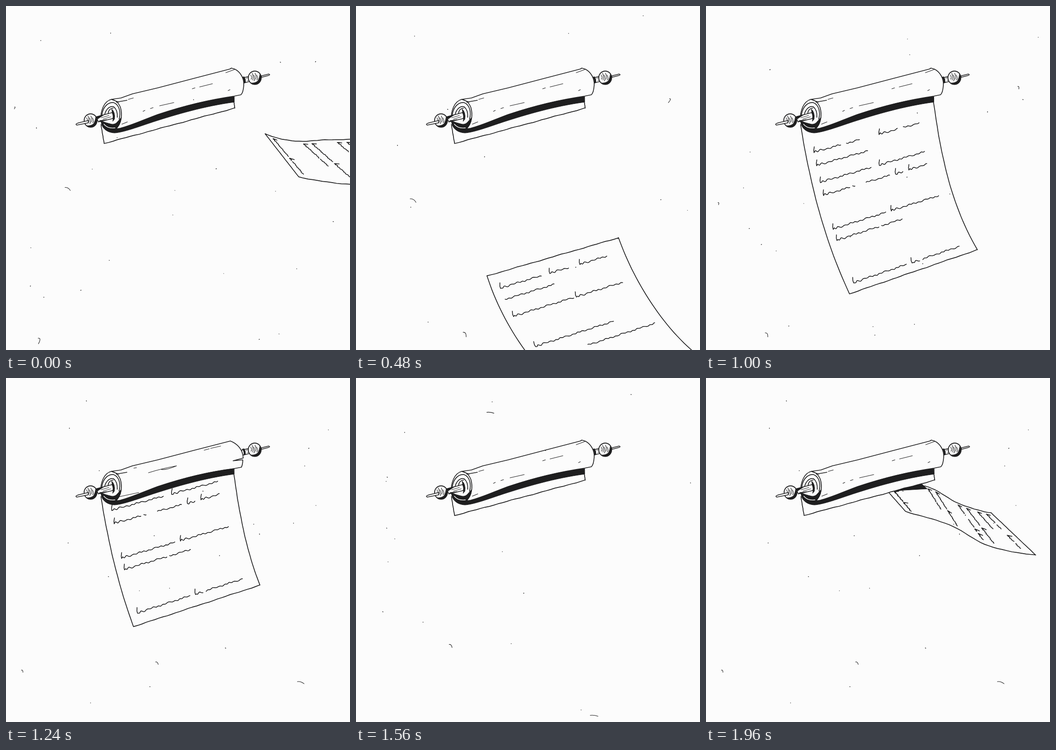
An HTML page with a canvas that plays this animation: 748x748 px, repeating every 2 s.

```html
<!DOCTYPE html>
<html lang="en">
<head>
<meta charset="utf-8">
<title>Scroll</title>
<style>
  html, body { margin: 0; width: 100%; height: 100%; overflow: hidden; background: #fcfcfc; }
  canvas { display: block; }
</style>
</head>
<body>
<canvas id="stage" width="748" height="748"></canvas>
<script>
const ctx = document.getElementById('stage').getContext('2d');
const SIZE = 748, INK = '#1e1e1f', PAPER = '#fcfcfc';
const LOOP = 2000, STEP = 40;

const mix = (a, b, k) => a + (b - a) * k;
const mixPt = (p, q, k) => [mix(p[0], q[0], k), mix(p[1], q[1], k)];
const mixPose = (a, b, k) => a.map((side, i) => side.map((p, j) => mixPt(p, b[i][j], k)));
const clamp = x => Math.min(1, Math.max(0, x));
const smooth = x => x * x * (3 - 2 * x);
const easeInOut = x => x < .5 ? 4 * x ** 3 : 1 - (2 - 2 * x) ** 3 / 2;

function rng(seed) {
  return () => (seed = (seed * 16807) % 2147483647) / 2147483647;
}

function paint(path, fill, width = 1.7) {
  const p = typeof path === 'string' ? new Path2D(path) : path;
  if (fill) { ctx.fillStyle = fill; ctx.fill(p); }
  if (width) { ctx.lineWidth = width; ctx.stroke(p); }
}

// Cubic through four evenly spaced points, w = 0..1
function cubic(p, w) {
  const n = 3 * w;
  return [0, 1].map(i => {
    const [a, b, c, d] = p.map(q => q[i]);
    return a + (b - a) * n + (c - 2 * b + a) * n * (n - 1) / 2
      + (d - 3 * c + 3 * b - a) * n * (n - 1) * (n - 2) / 6;
  });
}

// Catmull-Rom rail, first point at g = -1/3, spacing 1/3, straight past the end
function rail(p, g) {
  const last = p.length - 1, i = 3 * g + 1, k = Math.floor(i), f = i - k;
  const get = n => n <= 0 ? p[0] : n <= last ? p[n] : mixPt(p[last - 1], p[last], n - last + 1);
  const [a, b, c, d] = [k - 1, k, k + 1, k + 2].map(get);
  return [0, 1].map(j => b[j] + .5 * f * (c[j] - a[j]
    + f * (2 * a[j] - 5 * b[j] + 4 * c[j] - d[j] + f * (3 * (b[j] - c[j]) + d[j] - a[j]))));
}

// A sheet gives its left and right edge at w, from 0 at the top to 1 at the bottom
const ARRIVING = [
  [[284, 587], [329, 690], [395, 785], [480, 865]],
  [[570, 504], [614, 601], [676, 693], [752, 767]]];
const DOCKING = [
  [[213, 299], [240, 412], [270, 525], [313, 637]],
  [[499, 230], [514, 338], [548, 448], [595, 556]]];
const DOCKED = [
  [[213.5, 299], [237.5, 411], [270, 520], [313, 626]],
  [[497.5, 222], [516, 328], [545, 431], [591, 530]]];
const posed = (pose, shift = 0) => ({
  l: w => cubic(pose[0], w - shift),
  r: w => cubic(pose[1], w - shift)
});

// Rails of the flight to the right; the bottom of the sheet trails
const UPPER = [[340, 245], [395, 246], [476, 235], [548, 272], [620, 293], [700, 291]];
const LOWER = [[350, 256], [434, 290], [529, 319], [615, 365], [717, 385], [815, 389]];
const leaving = out => ({
  l: w => rail(UPPER, out + 1 - w),
  r: w => rail(LOWER, out + 1 - w)
});

// Handwriting: 48 columns per row, "h" opens a word with a tall stroke
const COLS = 48, WIDE = 285, HIGH = 335;
const LETTER = [
  [.07,  '   h---------  -----       h------  ------'],
  [.155, '   h------------------'],
  [.265, '   h------------------   h----------------'],
  [.35,  '   h--------- -    ---------  h--  h------'],
  [.575, '   h-------------------  h-----------------'],
  [.65,  '   h--------------- --------'],
  [.94,  '   h-------------------  h-- --------------']];
const FAR_LETTER = [
  [.10, '   h--------------   h------    h---------'],
  [.18, '   ------------------'],
  [.30, '   h--------------------- h----------------'],
  [.53, '    h----------------------------'],
  [.63, '                    -------------------------']];

function scribble(w, u, len, tall) {
  const pts = tall ? [[u + .01, w - 11 / HIGH], [u + .001, w - 4 / HIGH], [u, w + 1 / HIGH]] : [];
  const phase = w * 90 + u * 40;
  for (let s = tall ? 3 : 0; s <= len; s += 1.5) {
    const amp = tall ? .9 + 2 * Math.exp(-s / 12) : .9;
    const off = amp * Math.sin(s * .52 + phase + Math.sin(s * .13)) + .8 * Math.sin(s * .17 + phase);
    pts.push([u + s / WIDE, w + off / HIGH]);
  }
  return pts;
}

const write = rows => rows.flatMap(([w, row]) => [...row.matchAll(/h-*|-+/g)].map(m =>
  scribble(w, m.index / COLS, m[0].length / COLS * WIDE, m[0][0] === 'h')));
const letter = write(LETTER), farLetter = write(FAR_LETTER);

function drawText(text, sheet, from = 0, to = 1) {
  const path = new Path2D();
  for (const word of text) {
    let pen = false;
    for (const [u, w] of word) {
      const shown = w >= from && w <= to;
      if (shown) {
        const p = mixPt(sheet.l(w), sheet.r(w), u);
        pen ? path.lineTo(...p) : path.moveTo(...p);
      }
      pen = shown;
    }
  }
  paint(path, null, 1.6);
}

// The edges start at a (left) and ar (right) and end at b
function drawSheet(sheet, { a = 0, ar = a, b = 1, closed = true } = {}) {
  const path = new Path2D(), n = 30;
  const shake = i => .6 * Math.sin(i * 1.3) * Math.sin(i * .6);
  const edge = (f, from, to) => {
    for (let i = 0; i <= n; i++) {
      const [x, y] = f(mix(from, to, i / n));
      path.lineTo(x + shake(i) * .6, y + shake(i));
    }
  };
  const across = (w, from, to) => edge(k => mixPt(sheet.l(w), sheet.r(w), k), from, to);
  edge(sheet.l, a, b);
  across(b, 0, 1);
  edge(sheet.r, b, ar);
  if (closed) {
    across(a, 1, 0);
    path.closePath();
  }
  paint(path, PAPER);
}

function drawKnob(x, y) {
  ctx.save();
  ctx.translate(x, y);
  paint('M-14 0A14 14.5 0 1 1 14 0A14 14.5 0 1 1 -14 0Z', PAPER, 1.8);
  paint('M11 -8Q17 4 8 12Q0 17 -9 11Q2 12 7 6Q10 0 11 -8Z', INK, .5);
  ctx.beginPath();
  for (let i = 0; i < 5; i++) {
    const s = 3.2 * i - 9;
    ctx.moveTo(s, -6 - i % 2 * 4);
    ctx.quadraticCurveTo(s + 4, 0, s + 1, 3 + i % 3 * 2);
  }
  ctx.lineWidth = 1.1;
  ctx.stroke();
  ctx.restore();
}

const RIGHT_END = [
  'L487 137 490 135 497 137C510 143 518 158 517 172Q516 188 511 193L496 196',
  'L488 137C504 143 515 156 516 174L494 180 515 178Q515 188 512 194L496 197'];
const MARKS = [
  'M478 145L497 138M405 180L411 178M421 176L449 169M334 217L365 210M314 223L320 221'
    + 'M298 229L302 227M266 203L277 200M252 257L264 252M483 184L487 182',
  'M431 157L442 154M445 153L467 148M310 206Q338 197 371 191Q350 200 338 199M278 196L284 195M247 258L289 249'];

function drawRoll(side) {
  // Far handle
  paint('M512 157L536 151 537 162 515 168Z', PAPER, 1.5);
  paint('M514 155Q519 160 517 168L521 166Q521 158 518 154ZM522 157L531 155M525 162L532 160', INK, 1);
  drawKnob(541, 156);
  paint('M555 152L571 148Q576 149 571 151L556 155Z', PAPER, 1.4);

  // Body and its shaded underside
  paint('M206 250C205 228 213 207 229 203L250 200 275 191 330 178 410 157' + RIGHT_END[side]
    + 'C440 204 390 216 330 236C300 247 275 259 248 266C225 270 212 262 206 250Z', PAPER);
  paint('M496 197C440 204 390 216 330 236C300 247 275 260 248 266C225 270 212 262 207 249'
    + 'C206 262 216 275 236 276C255 275 290 262 320 252C370 236 430 218 496 209Z', INK, 1);
  paint(MARKS[side], null, 1.2);

  // Coiled end
  paint('M208 250Q214 268 236 269Q249 262 251 242L243 251Q238 258 230 257Q216 254 208 250Z', INK, 1);
  paint('M229 203Q243 205 249 221Q256 246 240 267M208 244C208 222 220 209 234 210C247 215 250 232 246 246'
    + 'M214 243C214 227 224 217 234 219Q243 226 242 242M222 234Q223 223 233 222M229 203L245 209M240 209L263 205');
  ctx.strokeStyle = PAPER;
  paint('M213 257Q221 267 237 265M233 254L240 247', null, 1.4);
  ctx.strokeStyle = INK;

  // Near handle
  paint('M196 241L230 232Q237 234 235 242L231 245 201 252Z', PAPER, 1.6);
  paint('M230 224Q238 231 236 246L232 251Q234 240 231 233ZM196 241L214 236 199 246ZM201 252L219 247 204 249Z', INK, .8);
  paint('M207 243L224 238M211 246L228 241', null, 1);
  drawKnob(184, 249);
  paint('M179 249L158 254Q149 257 154 259L179 254Z', PAPER, 1.5);
}

// Film dust: dots and a few scratches
function drawDust(seed) {
  const r = rng(7919 * (seed + 3)), place = () => mix(12, SIZE - 14, r());
  r();
  ctx.fillStyle = INK;
  for (let i = 8 + 14 * r(); i > 0; i--) {
    ctx.beginPath();
    ctx.ellipse(place(), place(), mix(.5, 1.3, r()), .8, 3 * r(), 0, 7);
    ctx.fill();
  }
  const path = new Path2D();
  for (let i = 0; i < 3; i++) {
    const x = place() * .95, y = place(), len = mix(4, 18, r()), turn = 2 * r();
    path.moveTo(x, y);
    path.quadraticCurveTo(x + len * .5, y - 1, x + len * Math.cos(turn), y + len * Math.sin(turn) * .8);
  }
  paint(path, null, 1.1);
}

function draw(t) {
  const dust = Math.floor(t % (LOOP * 17 / 48) / (LOOP / 24));
  ctx.fillStyle = PAPER;
  ctx.fillRect(0, 0, SIZE, SIZE);
  ctx.strokeStyle = INK;
  ctx.lineJoin = ctx.lineCap = 'round';
  ctx.save();
  ctx.translate(.9 * Math.sin(dust * 1.6), 0);

  // Sheet shooting out behind the roll
  const out = .74 * ((t < LOOP / 2 ? t + LOOP : t) - 1960) / STEP;
  if (out > -1.3 && out < 2) {
    const sheet = leaving(out), b = Math.min(1, out + 4 / 3);
    drawSheet(sheet, { b });
    drawText(letter, sheet, 0, b);
    if (out < .3) paint('M396 248L440 236 470 231 481 241 430 244Z', INK, 1);
  }

  // Hanging paper, pulled into the roll; the ink slides a little ahead of it
  const docked = t >= 860;
  const pull = docked ? easeInOut(clamp((t - 1000) / 590)) : 1;
  drawSheet(posed(DOCKED, pull), { a: pull - .12, ar: pull - .053, closed: false });
  if (docked) drawText(letter, posed(DOCKED, pull * 1.06), pull * 1.06 - .1);

  // Sheet flying in from below
  if (t >= 340 && !docked) {
    const sheet = posed(t < 760
      ? mixPose(DOCKING, ARRIVING, ((760 - t) / 280) ** 2)
      : mixPose(DOCKING, DOCKED, smooth((t - 760) / 100)));
    drawSheet(sheet);
    drawText(t < 620 ? farLetter : letter, sheet);
  }

  const turning = pull > .05 && pull < .95;
  drawRoll(turning ? Math.floor((t - 1000) / 80) % 2 : 0);
  ctx.restore();
  drawDust(dust);
}

function tick() {
  draw(Math.floor(performance.now() % LOOP / STEP) * STEP);
  requestAnimationFrame(tick);
}
tick();
</script>
</body>
</html>
```
